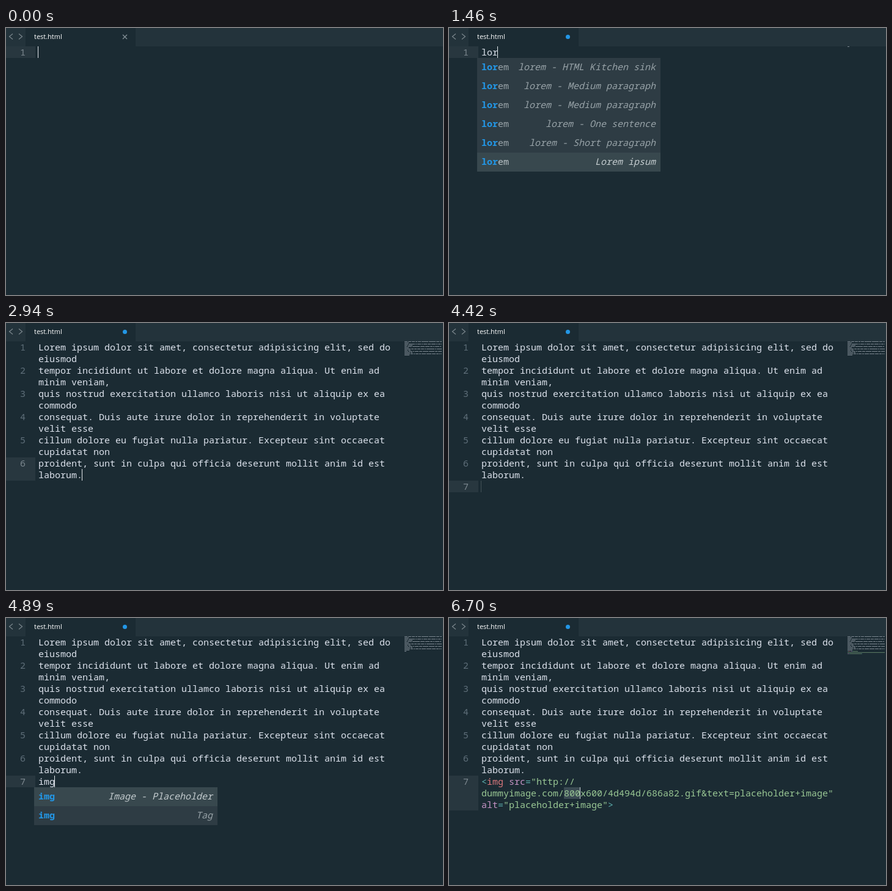
Write an HTML page with a canvas that moves like this. It is 715x437 px and loops after 6.77 s.

```html
<!DOCTYPE html>
<html lang="en">
<head>
<meta charset="utf-8">
<title>Snippet completion</title>
<style>
  html, body { margin: 0; width: 100%; height: 100%; overflow: hidden; background: #1b2b33; }
  canvas { display: block; }
</style>
</head>
<body>
<canvas id="stage" width="715" height="437"></canvas>
<script>
const ctx = document.getElementById("stage").getContext("2d");
const LOOP = 6770, CHAR = 9, LINE = 19, TOP = 30, LEFT = 53, ROW = 31;
const MONO = "15px 'Noto Sans Mono', monospace";
const BG = "#1b2b33", FG = "#dce2ec", BLUE = "#2397e6";
const RED = "#d9777c", PURPLE = "#c594c5", GREEN = "#99c794", CYAN = "#5fb3b3";

const LOREM = [
  "Lorem ipsum dolor sit amet, consectetur adipisicing elit, sed do", "eiusmod",
  "tempor incididunt ut labore et dolore magna aliqua. Ut enim ad", "minim veniam,",
  "quis nostrud exercitation ullamco laboris nisi ut aliquip ex ea", "commodo",
  "consequat. Duis aute irure dolor in reprehenderit in voluptate", "velit esse",
  "cillum dolore eu fugiat nulla pariatur. Excepteur sint occaecat", "cupidatat non",
  "proident, sunt in culpa qui officia deserunt mollit anim id est", "laborum."
];
// Each wrapped row is a list of [text, colour] spans.
const IMG_TAG = [
  [["<", CYAN], ["img", RED], [" src", PURPLE], ["=", CYAN], ['"http://', GREEN]],
  [['dummyimage.com/800x600/4d494d/686a82.gif&text=placeholder+image"', GREEN]],
  [["alt", PURPLE], ["=", CYAN], ['"placeholder+image"', GREEN], [">", CYAN]]
];
const LOREM_ITEMS = ["HTML Kitchen sink", "Medium paragraph", "Medium paragraph", "One sentence", "Short paragraph"]
  .map(name => ["lorem", "lorem - " + name]).concat([["lorem", "Lorem ipsum"]]);
const L_ITEMS = [...LOREM_ITEMS, ["livereload", "Insert livereload.js script"], ["li", "Tag"]];
const IMG_ITEMS = [["img", "Image - Placeholder"], ["img", "Tag"]];
const I_ITEMS = [...IMG_ITEMS, ...["i", "iframe", "input", "ins"].map(name => [name, "Tag"])];

const word = text => [[[text, FG]]];
const paragraph = LOREM.flatMap(word);
const typed = (text, items, width, extra) => ({ rows: word(text), typed: text, items, width, selected: 5, ...extra });
const tag = (text, items) => ({
  rows: [...paragraph, ...word(text)], typed: text, items, width: 300, selected: 0
});

// [start time, editor state]
const STATES = [
  [0, { rows: word(""), saved: true }],
  [1140, typed("l", L_ITEMS, 351, { scrollbar: true })],
  [1310, typed("lo", L_ITEMS, 351)],
  [1460, typed("lor", LOREM_ITEMS, 300)],
  [1610, typed("lore", LOREM_ITEMS, 300)],
  [1770, typed("lorem", LOREM_ITEMS, 300)],
  [2790, { rows: paragraph }],
  [4020, { rows: [...paragraph, ...word("")] }],
  [4570, tag("i", I_ITEMS)],
  [4740, tag("im", IMG_ITEMS)],
  [4815, tag("img", IMG_ITEMS)],
  [5210, { rows: [...paragraph, ...IMG_TAG], field: { row: 13, from: 15, to: 18 } }]
];
// [start time, caret opacity]
const CARET = [
  [0, 1], [140, .45], [220, 0], [770, .5], [850, 1], [2160, .45], [2250, 0], [2390, 1],
  [3320, .45], [3490, 0], [4020, 1], [4330, .6], [4420, .2], [4570, 1],
  [5510, .8], [5680, .35], [5760, 0], [6300, .5], [6380, 1], [6700, .85]
];
const at = (steps, t) => steps.findLast(step => step[0] <= t)[1];

function rect(x, y, w, h, color) {
  ctx.fillStyle = color;
  ctx.fillRect(x, y, w, h);
}
function text(str, x, y, color, font = MONO, align = "left") {
  ctx.font = font;
  ctx.fillStyle = color;
  ctx.textAlign = align;
  ctx.fillText(str, x, y);
}
function stroke(path, color) {
  ctx.strokeStyle = color;
  ctx.lineWidth = 1.2;
  ctx.stroke(new Path2D(path));
}

function drawTabs(saved) {
  rect(0, 0, 715, TOP, "#23333b");
  rect(32, 0, 180, TOP, BG);
  stroke("M11 9.5L5.5 14L11 18.5M21 9.5L26.5 14L21 18.5", "#7b878d");
  text("test.html", 46, 18, "#fff", "500 11px 'Open Sans', sans-serif");
  if (saved) return stroke("M191 11L198 18M198 11L191 18", "#87939a");
  ctx.fillStyle = BLUE;
  ctx.beginPath();
  ctx.arc(194.5, 14.5, 3.5, 0, 7);
  ctx.fill();
}

function drawMinimap(rows) {
  ctx.globalAlpha = .5;
  rows.forEach((spans, r) => {
    let x = 652;
    for (const [str, color] of spans)
      for (const ch of str) {
        if (ch !== " " && x < 713) rect(x, TOP + r * 2, 1, 1, color);
        x++;
      }
  });
  ctx.globalAlpha = 1;
}

function drawEditor({ rows, field }, caretAlpha) {
  const last = rows.length - 1;
  const activeRow = Math.min(12, last - last % 2);
  rect(0, TOP + activeRow * LINE, 48, (rows.length - activeRow) * LINE, "#28373f");
  if (field)
    rect(LEFT + field.from * CHAR, TOP + field.row * LINE, (field.to - field.from) * CHAR, LINE, "#3b4b53");

  rows.forEach((spans, r) => {
    const y = TOP + r * LINE + 15;
    let x = LEFT;
    if (r % 2 === 0 && r <= 12) text(r / 2 + 1, 32, y, r === activeRow ? "#7c888f" : "#5f6f7a", MONO, "right");
    for (const [str, color] of spans) {
      text(str, x, y, color);
      x += str.length * CHAR;
    }
  });

  const caretRow = field ? field.row : last;
  const column = field ? field.to : rows[last][0][0].length;
  ctx.globalAlpha = caretAlpha;
  rect(LEFT - 1 + column * CHAR, TOP + caretRow * LINE, 1, LINE, "#e4e8ec");
  ctx.globalAlpha = 1;
}

function drawPopup({ rows, typed, items, width, selected, scrollbar }) {
  const top = TOP + rows.length * LINE;
  const height = items.length * ROW;
  rect(46, top, width + (scrollbar ? 10 : 0), height, "#2e3c44");
  if (scrollbar) rect(46 + width, top, 10, 165, "#4f5d62");
  items.forEach(([name, hint], i) => {
    const y = top + i * ROW, active = i === selected;
    if (active) rect(46, y, width, ROW, "#38484e");
    [...name].reduce((matched, ch, c) => {
      const hit = ch === typed[matched];
      text(ch, LEFT + c * CHAR, y + 20, hit ? BLUE : active ? "#bcc5c9" : "#9ca6ab", (hit ? "bold " : "") + MONO);
      return matched + hit;
    }, 0);
    text(hint, 38 + width, y + 20, active ? "#c4cccf" : "#98a3a8", "italic " + MONO, "right");
  });
}

function draw(now) {
  const t = now % LOOP;
  const state = at(STATES, t);
  rect(0, 0, 715, 437, BG);
  drawTabs(state.saved);
  drawMinimap(state.rows);
  drawEditor(state, at(CARET, t));
  if (state.items) drawPopup(state);
  requestAnimationFrame(() => draw(performance.now() - start));
}
const start = performance.now();
draw(0);
</script>
</body>
</html>
```
